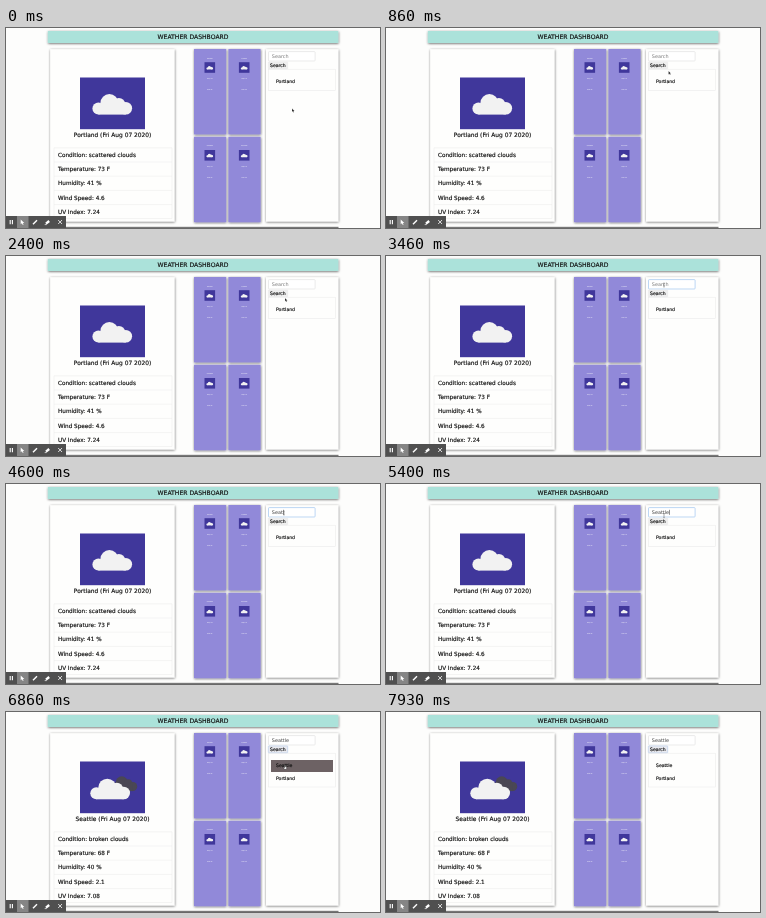
An HTML page for the animation above (8000 ms loop, 374 by 200 pixels).

```html
<!DOCTYPE html>
<html lang="en">
<head>
<meta charset="utf-8">
<title>Weather dashboard</title>
<style>
  html, body { margin: 0; width: 100%; height: 100%; overflow: hidden; background: #fdfdfc; }
  svg { display: block; width: 100%; height: 100%; }
  text { font-family: "DejaVu Sans", Verdana, sans-serif; fill: #111; stroke: #111; stroke-width: .16; }
  .fact { font-size: 5.7px; }
  .small { font-size: 4.6px; }
  .tiny { font-size: 1.1px; font-weight: bold; fill: #fff; stroke: none; text-anchor: middle; }
  .mid { text-anchor: middle; }
  .line { fill: none; stroke: #e8e8e8; stroke-width: .5; }
</style>
</head>
<body>
<svg viewBox="0 0 374 200" preserveAspectRatio="none">
  <defs>
    <filter id="lift" x="-5%" y="-20%" width="112%" height="150%">
      <feDropShadow dx=".3" dy=".7" stdDeviation=".8" flood-color="#000" flood-opacity=".6"/>
    </filter>
    <g id="cloud">
      <circle cx="-14" cy="4.3" r="6"/>
      <circle cx="-3" cy="-1.3" r="9"/>
      <circle cx="6.5" cy="0" r="6.3"/>
      <circle cx="13.4" cy="4" r="6.3"/>
      <rect x="-14" y="0" width="27.4" height="10.3"/>
    </g>
  </defs>

  <rect width="374" height="200" fill="#fdfdfc"/>
  <rect x="41.8" y="3" width="290.5" height="12" fill="#abe2da" filter="url(#lift)"/>
  <text class="mid" x="187" y="11.3" font-size="6.1">WEATHER DASHBOARD</text>

  <g fill="#fefefd">
    <rect x="44.2" y="21.2" width="124.3" height="172.3" filter="url(#lift)"/>
    <rect x="260" y="21.2" width="72.3" height="172.3" filter="url(#lift)"/>
  </g>

  <rect x="74" y="49.5" width="65" height="51.7" fill="#40379b"/>
  <g id="scattered" fill="#f2f2f2"><use href="#cloud" x="106.4" y="76.3"/></g>
  <g id="broken">
    <use href="#cloud" fill="#4a4753" transform="translate(117.8 71.7) scale(.68 .72)"/>
    <use href="#cloud" fill="#f2f2f2" x="104.3" y="77"/>
  </g>
  <text id="heading" class="mid" x="106.6" y="109" font-size="5.9"></text>
  <g id="facts"></g>
  <g id="forecast"></g>

  <rect id="field" x="262.5" y="23.6" width="46.6" height="9.4" rx=".8" fill="#fff" stroke-width=".6"/>
  <text id="query" x="265.8" y="30" font-size="4.9" style="stroke: none"></text>
  <rect id="caret" y="25.8" width=".5" height="5" fill="#222"/>
  <rect id="button" x="262.3" y="33.9" width="19.4" height="7" rx=".6" stroke-width=".5"/>
  <text class="small" x="264" y="39">Search</text>

  <rect id="list" class="line" x="262.6" y="41.2" width="66.9"/>
  <rect id="hover" x="265" y="48" width="62" height="12" fill="#6d6264"/>
  <text id="city1" class="small" x="270" y="55.4"></text>
  <text id="city2" class="small" x="270" y="67.5">Portland</text>

  <rect x="42" y="198.8" width="290.5" height="1.2" fill="#777"/>
  <g fill="#505050">
    <rect y="188" width="60" height="12"/>
    <rect x="11" y="188" width="11.5" height="12" fill="#858585"/>
    <g fill="none" stroke="#fff" stroke-width="1.1">
      <path d="M4.2 192v4.2M6.4 192v4.2"/>
      <path d="M52.2 192l3.8 4M56 192l-3.8 4" stroke-width=".8"/>
      <path d="M27 196.2l4-4" stroke-width="1.4"/>
      <path d="M40 195.6l3.2-2.6" stroke-width="2.4"/>
      <path d="M38.7 196.6h2" stroke-width=".7"/>
    </g>
    <path d="M14.7 191.4v4.8l1.2-1 .9 1.8.8-.4-.8-1.7h1.5z" fill="#fff"/>
  </g>

  <circle id="ring" fill="#f6a79d" fill-opacity=".05" stroke="#e8827c" stroke-width=".9"/>
  <g id="pointer">
    <path id="arrow" d="M0 0v3.6l.9-.8.6 1.2.6-.3-.6-1.2h1z" fill="#111" stroke="#fff" stroke-width=".25"/>
    <path id="beam" d="M-.6 -2h1.2M0 -2v4M-.6 2h1.2" fill="none" stroke="#444" stroke-width=".45"/>
    <path id="hand" d="M-.3 0h.6v1.5l1.3.3v1.7l-.5.8h-1.7l-1-1.8.5-.3.8.5z" fill="#fff" stroke="#222" stroke-width=".4"/>
  </g>
</svg>
<script>
const LOOP = 8000;
const FOCUS = 2930, BLUR = 6200, RESULT = 6400;
const CLICKS = [{ at: 2860, x: 278, y: 29 }, { at: 6000, x: 278, y: 36.7 }];
const CLICK_TIME = 400;
const KEYS = [3730, 4000, 4260, 4460, 4730, 4930, 5190];
// time, x, y
const PATH = [
  [0, 286, 80.5], [100, 286, 80.5], [860, 282.5, 43], [1800, 282.5, 43],
  [2400, 279, 42], [2730, 278, 29], [5260, 278, 29], [5600, 278, 36],
  [6400, 278, 36], [6660, 279, 53], [6900, 279, 53], [7400, 268, 72]
];
const POINTER_END = 7480;
const CITIES = {
  Portland: ["scattered clouds", "73 F", "41 %", "4.6", "7.24"],
  Seattle: ["broken clouds", "68 F", "40 %", "2.1", "7.08"]
};
const LABELS = ["Condition", "Temperature", "Humidity", "Wind Speed", "UV Index"];

const $ = id => document.getElementById(id);
const show = (id, on) => $(id).setAttribute("visibility", on ? "visible" : "hidden");
const set = (id, attrs) => {
  for (const name in attrs) $(id).setAttribute(name, attrs[name]);
};
const write = (id, text) => {
  if ($(id).textContent !== text) $(id).textContent = text;
};

$("facts").innerHTML = LABELS.map((_, i) => {
  const y = 119.8 + i * 14.2;
  return `<path class="line" d="M48 ${y}h118"/>
    <text class="fact" id="fact${i}" x="52" y="${y + 9.2}"></text>`;
}).join("") + '<path class="line" d="M48 119.8V190.5H166V119.8"/>';

$("forecast").innerHTML = [0, 1, 2, 3].map(i => {
  const x = 188 + (i % 2) * 34.4, y = 21 + (i >> 1) * 87.8, cx = x + 15.8;
  const line = (text, dy) => `<text class="tiny" x="${cx}" y="${y + dy}">${text}</text>`;
  return `<rect x="${x}" y="${y}" width="32.2" height="85.4" fill="#9189d9" filter="url(#lift)"/>
    <rect x="${cx - 5.3}" y="${y + 13.2}" width="10.6" height="10.6" fill="#40379b"/>
    <use href="#cloud" fill="#f2f2f2" transform="translate(${cx} ${y + 18.7}) scale(.17)"/>
    ${line(`8/${8 + i}/2020`, 9.5)}${line("Temp: 75", 30)}${line("Hum: 40", 41.4)}`;
}).join("");

const ease = p => p * p * (3 - 2 * p);

function pointerAt(t) {
  const next = PATH.findIndex(p => p[0] > t);
  if (next < 0) return PATH[PATH.length - 1].slice(1);
  const [a, b] = [PATH[next - 1], PATH[next]];
  const p = ease((t - a[0]) / (b[0] - a[0]));
  return [a[1] + (b[1] - a[1]) * p, a[2] + (b[2] - a[2]) * p];
}

function drawField(t) {
  const focused = t >= FOCUS && t < BLUR;
  const pressed = t >= BLUR;
  const struck = KEYS.filter(k => t >= k);
  const typed = "Seattle".slice(0, struck.length);
  write("query", typed || "Search");
  $("query").style.fill = typed ? "#444" : "#7d7d7d";
  set("field", { stroke: focused ? "#91bdec" : "#dedede" });
  set("button", { fill: pressed ? "#e9eaf0" : "#efefef", stroke: pressed ? "#a9c2e6" : "#e6e6e6" });

  const lastKey = Math.max(FOCUS + 30, ...struck);
  const width = typed ? $("query").getComputedTextLength() : 0;
  set("caret", { x: 266 + width });
  show("caret", focused && (t - lastKey) % 1000 < 500);
}

function drawResult(t, y) {
  const found = t >= RESULT;
  const city = found ? "Seattle" : "Portland";
  write("heading", `${city} (Fri Aug 07 2020)`);
  CITIES[city].forEach((value, i) => write("fact" + i, `${LABELS[i]}: ${value}`));
  show("scattered", !found);
  show("broken", found);
  write("city1", city);
  show("city2", found);
  set("list", { height: found ? 33.8 : 21.3 });
  const over = found && t < POINTER_END && y >= 48 && y <= 60;
  show("hover", over);
  return over;
}

function drawPointer(t, [x, y], overItem) {
  const inField = y > 23.6 && y < 33;
  const onButton = y >= 34 && y < 40.5;
  const visible = t < POINTER_END;
  set("pointer", { transform: `translate(${x} ${y})` });
  show("beam", visible && inField);
  show("hand", visible && (onButton || overItem));
  show("arrow", visible && !inField && !onButton && !overItem);

  const click = CLICKS.find(c => t >= c.at && t < c.at + CLICK_TIME);
  show("ring", click);
  if (click) {
    const p = (t - click.at) / CLICK_TIME;
    const r = 2 + 9.3 * (1 - (1 - p) ** 3);
    set("ring", { cx: click.x, cy: click.y, r, opacity: Math.min(1, 1.6 * (1 - p)) });
  }
}

function draw(t) {
  const at = pointerAt(t);
  drawField(t);
  drawPointer(t, at, drawResult(t, at[1]));
}

const start = performance.now();
function tick() {
  draw((performance.now() - start) % LOOP);
  requestAnimationFrame(tick);
}
tick();
</script>
</body>
</html>
```
